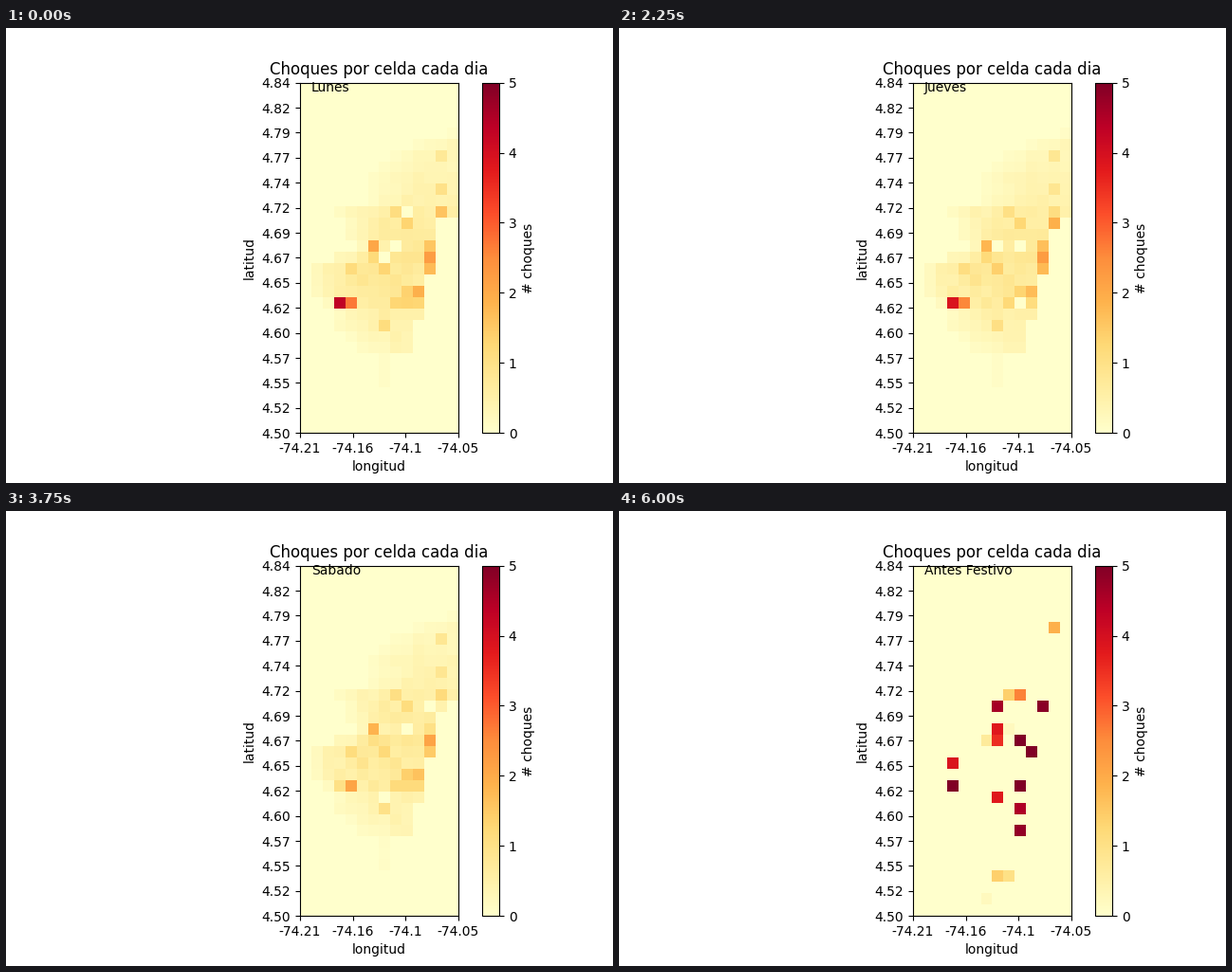
Animation, 640 px wide and 480 px high, one loop 6750 ms. Source, as a matplotlib script:

```python
import numpy as np
import matplotlib.pyplot as plt
from matplotlib.animation import FuncAnimation

ROWS, COLS = 31, 14

# Busy cells of an ordinary day, {(row, column): crashes}
HOT = {
    (19, 3): 4, (19, 4): 2.4, (14, 6): 2, (15, 11): 2.4, (14, 11): 1.7,
    (16, 11): 1.7, (18, 10): 1.8, (18, 9): 1.4, (19, 8): 1.2, (19, 9): 1.2,
    (19, 10): 1.2, (16, 4): 1.1, (16, 7): 1.3, (15, 6): 1.1, (21, 7): 1.1,
    (11, 8): 1.1, (11, 12): 1.2, (12, 9): 1.2, (6, 12): .8, (9, 12): .9,
}
# Scattered crashes on the eve of a holiday
EVE = {
    (5, 12): 1.9, (11, 8): 1.4, (11, 9): 2.6, (12, 7): 4.6, (12, 11): 4.9,
    (14, 7): 3.8, (14, 8): .2, (15, 6): .7, (15, 7): 3.5, (15, 9): 5,
    (16, 10): 5, (17, 3): 3.9, (19, 3): 5, (19, 9): 5, (20, 7): 3.8,
    (21, 9): 4.5, (23, 9): 4.8, (27, 7): 1.4, (27, 8): 1, (29, 6): .2,
}
# Name, overall level, cells that stand out that day
DAYS = [
    ("Lunes", 1, {(19, 3): 4.3, (19, 4): 2.7, (11, 12): 1.6, (11, 9): 0,
                  (12, 12): 0, (14, 8): 0, (15, 7): 0}),
    ("Martes", 1, {(19, 3): 3.5, (14, 6): 2.3, (12, 12): 1.5, (11, 9): 0,
                   (15, 7): 0, (15, 9): 0}),
    ("Miercoles", 1, {}),
    ("Jueves", 1, {(19, 3): 3.9, (12, 12): 1.9, (19, 9): 0, (14, 7): 0,
                   (14, 9): 0}),
    ("Viernes", 1, {}),
    ("Sabado", .95, {(19, 3): 1, (14, 11): 1, (12, 11): 0, (14, 9): 0,
                     (20, 7): 0}),
    ("Domingo", .75, {(19, 3): .7, (19, 4): 1.6, (14, 11): .3, (12, 12): 0,
                      (20, 7): 0}),
    ("Festivo", .7, {(19, 3): .7, (20, 7): 0}),
    ("Antes Festivo", 0, EVE),
]


def put(grid, cells):
    for cell, value in cells.items():
        grid[cell] = value


def usual_grid():
    """City footprint: densest in the middle rows, fading to the west."""
    row, col = np.mgrid[:ROWS, :COLS]
    first = np.rint(np.interp(row, [4, 6, 8, 10, 11, 14, 16, 18, 23, 24],
                              [13, 8, 6, 6, 3, 5, 1, 1, 5, 7]))
    last = np.rint(np.interp(row, [11, 13, 16, 17, 20, 21, 23, 24],
                             [13, 11, 11, 10, 10, 9, 9, 7]))
    inside = (row > 3) & (row < 27) & (col >= first) & (col <= last)
    level = .3 + .5 * np.exp(-((row - 15.5) / 5) ** 2)
    fade = np.minimum((col - first + 1.5) / 5, 1)
    rng = np.random.default_rng(5)
    grid = inside * level * fade * rng.uniform(.85, 1.15, level.shape)
    put(grid, HOT)
    return grid


def day_grid(day):
    _, level, cells = DAYS[day]
    rng = np.random.default_rng(day)
    grid = usual * level * rng.uniform(.9, 1.1, usual.shape)
    put(grid, cells)
    return grid


def ticks(end, labels):
    return np.linspace(0, end, len(labels)), labels


usual = usual_grid()
grids = [day_grid(day) for day in range(len(DAYS))]

fig, ax = plt.subplots(figsize=(6.4, 4.8), dpi=100)
heat = ax.imshow(grids[0], cmap="YlOrRd", vmin=0, vmax=5,
                 extent=(0, COLS, 0, ROWS), interpolation="nearest")
fig.colorbar(heat, label="# choques")
ax.set_title("Choques por celda cada dia")
ax.set_xlabel("longitud")
ax.set_ylabel("latitud")
ax.set_xticks(*ticks(COLS, ["-74.21", "-74.16", "-74.1", "-74.05"]))
ax.set_yticks(*ticks(ROWS, "4.50 4.52 4.55 4.57 4.60 4.62 4.65 4.67 4.69 "
                           "4.72 4.74 4.77 4.79 4.82 4.84".split()))
label = ax.text(1, 30.2, DAYS[0][0])


def update(day):
    heat.set_data(grids[day])
    label.set_text(DAYS[day][0])
    return heat, label


anim = FuncAnimation(fig, update, frames=len(DAYS), interval=750, repeat=True)
plt.show()
```
